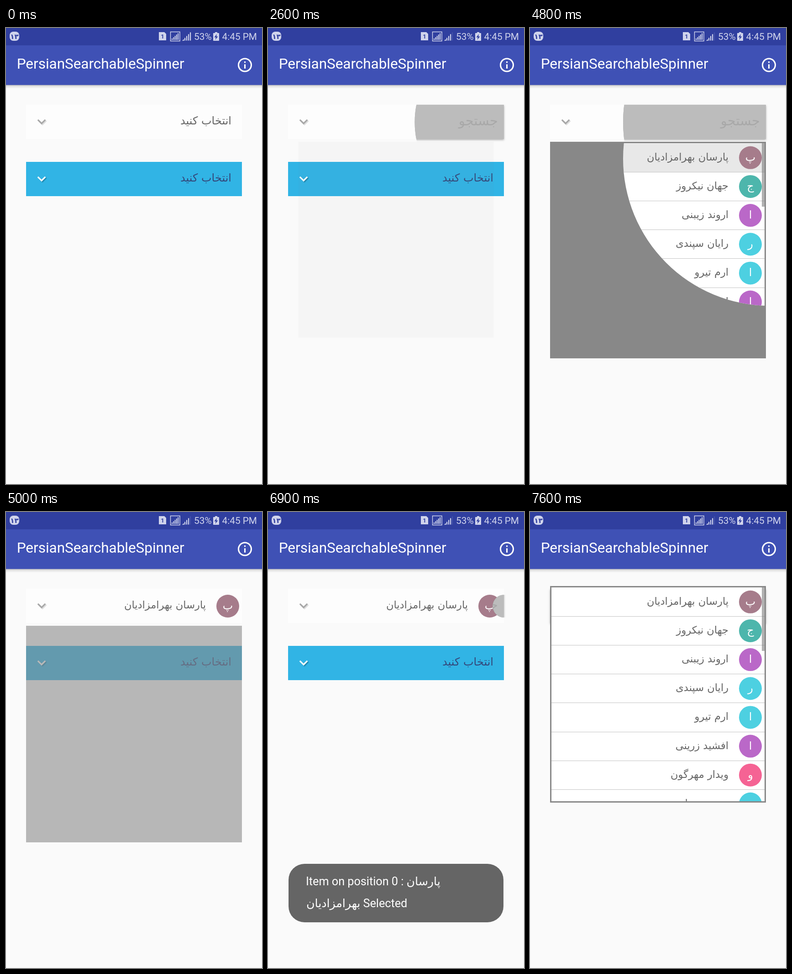
An HTML page with a canvas that plays this animation: 561 px wide and 998 px high, repeating every 8000 ms.

```html
<!DOCTYPE html>
<html lang="fa">
<head>
<meta charset="utf-8">
<title>PersianSearchableSpinner</title>
<style>
  html, body { margin: 0; width: 561px; height: 998px; overflow: hidden; background: #fafafa; }
  canvas { display: block; }
</style>
</head>
<body>
<canvas id="stage" width="561" height="998"></canvas>
<script>
const W = 561, H = 998, LOOP = 8000, TAU = Math.PI * 2;
const stage = document.getElementById('stage').getContext('2d');
const layerCanvas = Object.assign(document.createElement('canvas'), { width: W, height: H });
const layerCtx = layerCanvas.getContext('2d');
let c = stage;

const FA = '"DejaVu Sans", sans-serif';
const EN = 'Roboto, sans-serif';
const PALE = '#d0d4ec', NAVY = '#303f9f', GREY = '#888';
const PICK = 'انتخاب کنید';
const PEOPLE = [
  ['پارسان بهرامزادیان', '#a67c8b'],
  ['جهان نیکروز', '#4db6ac'],
  ['اروند زیبنی', '#ba68c8'],
  ['رایان سپندی', '#4dd0e1'],
  ['ارم تیرو', '#4dd0e1'],
  ['افشید زرینی', '#ba68c8'],
  ['ویدار مهرگون', '#f56394'],
  ['سپهر نیسا', '#4dd0e1']
];
const LEFT = 44, WIDE = 473;
const LIST = { h: 474, row: 63.15, border: 3 };

const clamp = v => Math.max(0, Math.min(1, v));
const ramp = (t, start, dur) => clamp((t - start) / dur);
const ease = p => (1 - Math.cos(Math.PI * p)) / 2;

function box(x, y, w, h, fill) {
  c.fillStyle = fill;
  c.fillRect(x, y, w, h);
}

function round(x, y, w, h, r, fill) {
  c.fillStyle = fill;
  c.beginPath();
  c.roundRect(x, y, w, h, r);
  c.fill();
}

function poly(points, fill) {
  c.fillStyle = fill;
  c.beginPath();
  points.forEach(([x, y]) => c.lineTo(x, y));
  c.fill();
}

function disc(x, y, r, fill) {
  c.fillStyle = fill;
  c.beginPath();
  c.arc(x, y, r, 0, TAU);
  c.fill();
}

function clipCircle(x, y, r) {
  c.beginPath();
  c.arc(x, y, r, 0, TAU);
  c.clip();
}

function text(str, x, y, font, fill, align = 'left', dir = 'ltr') {
  c.font = font;
  c.direction = dir;
  c.textAlign = align;
  c.fillStyle = fill;
  c.fillText(str, x, y);
}

const persian = (str, x, y, size, fill, align = 'right') =>
  text(str, x, y, size + 'px ' + FA, fill, align, 'rtl');

// Draws a group once, then lays it down with a single opacity.
function group(alpha, draw, scale = 1, px = 0, py = 0) {
  if (alpha <= 0) return;
  layerCtx.clearRect(0, 0, W, H);
  c = layerCtx;
  draw();
  c = stage;
  c.save();
  c.globalAlpha = alpha;
  c.translate(px, py);
  c.scale(scale, scale);
  c.drawImage(layerCanvas, -px, -py);
  c.restore();
}

function chevron(y, dir, color, shade) {
  c.save();
  c.strokeStyle = color;
  c.lineWidth = 3.2;
  c.shadowColor = shade;
  c.shadowOffsetX = c.shadowOffsetY = 2;
  c.shadowBlur = 1;
  c.beginPath();
  c.moveTo(69.8, y - 4.2 * dir);
  c.lineTo(78, y + 4 * dir);
  c.lineTo(86.2, y - 4.2 * dir);
  c.stroke();
  c.restore();
}

function avatar(i, x, y) {
  const [name, color] = PEOPLE[i];
  disc(x, y, 25, color);
  persian(name[0], x, y + 7, 24, '#fff', 'center');
}

function statusBar(weakSignal) {
  box(0, 0, W, 38, NAVY);
  round(8, 8, 21, 20, 8, PALE);
  text('۱۳', 18.5, 23.5, 'bold 15px ' + FA, NAVY, 'center');

  poly([[335, 9], [347, 9], [351, 13], [351, 27], [335, 27]], PALE);
  text('1', 343, 23, 'bold 13px ' + EN, NAVY, 'center');

  c.strokeStyle = PALE;
  c.lineWidth = 1.5;
  c.strokeRect(360.5, 8.5, 20.5, 20);
  for (let i = 0; i < 5; i++) {
    const h = 3 + i * 2.9;
    box(363 + i * 3.3, 26 - h, 2, h, PALE);
  }
  poly([[386, 28], [390, 24], [390, 28]], PALE);
  for (let i = 0; i < 4; i++) {
    const h = 6 + i * 4;
    box(391 + i * 4, 27.5 - h, 2.2, h, weakSignal && i === 3 ? '#4352a8' : PALE);
  }

  text('53%', 412, 26, '20.8px ' + EN, PALE);
  box(458, 9, 5, 3, PALE);
  round(454, 11, 13, 17, 1, PALE);
  poly([[462, 13], [456.5, 20.5], [460, 20.5], [458.5, 26], [464.5, 18.5], [461, 18.5]], NAVY);
  text('4:45 PM', 550, 26, '20.8px ' + EN, PALE, 'right');
}

function appBar() {
  const shade = c.createLinearGradient(0, 124, 0, 133);
  shade.addColorStop(0, 'rgba(0,0,0,.28)');
  shade.addColorStop(0.4, 'rgba(0,0,0,.09)');
  shade.addColorStop(1, 'rgba(0,0,0,0)');
  box(0, 124, W, 9, shade);
  box(0, 37.5, W, 87.2, '#3f51b5');
  text('PersianSearchableSpinner', 23.7, 89, '31.45px ' + EN, '#fff');
  c.strokeStyle = '#fff';
  c.lineWidth = 3.1;
  c.beginPath();
  c.arc(523.5, 81, 14, 0, TAU);
  c.stroke();
  box(522, 73.2, 3.1, 3.1, '#fff');
  box(522, 79.4, 3.1, 9.4, '#fff');
}

function cards(selected) {
  box(LEFT, 168, WIDE, 75, '#fdfdfd');
  chevron(205, 1, '#a8a8a8', '#ddd');
  if (selected) {
    avatar(0, 486, 206);
    persian(PEOPLE[0][0], 438, 211, 22.5, '#666');
  } else {
    persian(PICK, 494, 211, 24, '#666');
  }
  box(LEFT, 293, WIDE, 75, '#31b4e5');
  chevron(330, 1, '#fff', '#1f86ad');
  persian(PICK, 494, 336, 24, '#34497c');
}

function searchBar(r) {
  if (r <= 1) return;
  c.save();
  clipCircle(517, 206, r);
  c.save();
  c.shadowColor = 'rgba(0,0,0,.3)';
  c.shadowBlur = 4;
  c.shadowOffsetY = 1.5;
  box(LEFT, 168, WIDE, 75, '#bcbcbc');
  c.restore();
  chevron(206, -1, '#888', '#aaa');
  persian('جستجو', 504, 213, 29, '#a8a8a8');
  c.restore();
}

function list(top, r, touch) {
  const { h, row, border } = LIST;
  box(LEFT, top, WIDE, h, GREY);
  if (r <= 1) return;
  c.save();
  c.beginPath();
  c.rect(LEFT + border, top + border, WIDE - 2 * border, h - 2 * border);
  c.clip();
  if (r < 640) clipCircle(LEFT + 482, top + 37, r);
  box(LEFT, top, WIDE, h, '#fff');
  if (touch > 0) {
    c.save();
    c.beginPath();
    c.rect(LEFT, top, WIDE, 66);
    c.clip();
    disc(400, top + 34, 380 * touch, 'rgba(0,0,0,.09)');
    c.restore();
  }
  PEOPLE.forEach(([name], i) => {
    const y = top + 34.8 + i * row;
    box(LEFT, Math.round(y + 31.2), WIDE, 1, '#c4c4c4');
    avatar(i, 483, y);
    persian(name, 435, y + 6, 22.5, '#666');
  });
  box(508, top + border, 7, 139, 'rgba(125,125,125,.6)');
  c.restore();
}

function toast() {
  round(45, 770, 471, 128, 35, '#656565');
  const [first, last] = PEOPLE[0][0].split(' ');
  const font = '25.2px Roboto, ' + FA;
  text('Item on position 0 : ' + first, 83, 817, font, '#fff');
  text(last + ' Selected', 84, 865, font, '#fff');
}

// Radii and opacity of the drop-down for the opening that begins at `start`.
const opening = (t, start) => ({
  bar: 626 * ease(ramp(t, start - 51, 400)),
  list: 644 * ease(ramp(t, start + 102, 300)),
  alpha: ramp(t, start + 94, 150)
});

function dropDown(t) {
  if (t < 4600) return opening(t, 2500);
  if (t >= 6900) return opening(t, 6900);
  const left = 1 - ease(ramp(t, 4600, 400));
  return { bar: 626 * left, list: 644 * left, alpha: 1 - ramp(t, 4950, 120) };
}

function draw(t) {
  const d = dropDown(t);
  const again = t >= 6900;
  const top = again ? 162 : 249;
  const touch = again ? 0 : ramp(t, 4250, 400);
  const scale = t > 4600 && !again ? 1 : 0.9 + 0.1 * d.alpha;

  box(0, 0, W, H, '#fafafa');
  appBar();
  statusBar(t >= 2500);
  cards(t >= 4600);
  searchBar(d.bar);
  group(d.alpha, () => list(top, d.list, touch), scale, 280.5, top);
  group(ramp(t, 5020, 230) * (1 - ramp(t, 6910, 500)), toast);
}

// The picture advances ten times a second.
function tick() {
  draw(Math.floor(performance.now() % LOOP / 100) * 100);
  requestAnimationFrame(tick);
}
tick();
</script>
</body>
</html>
```
